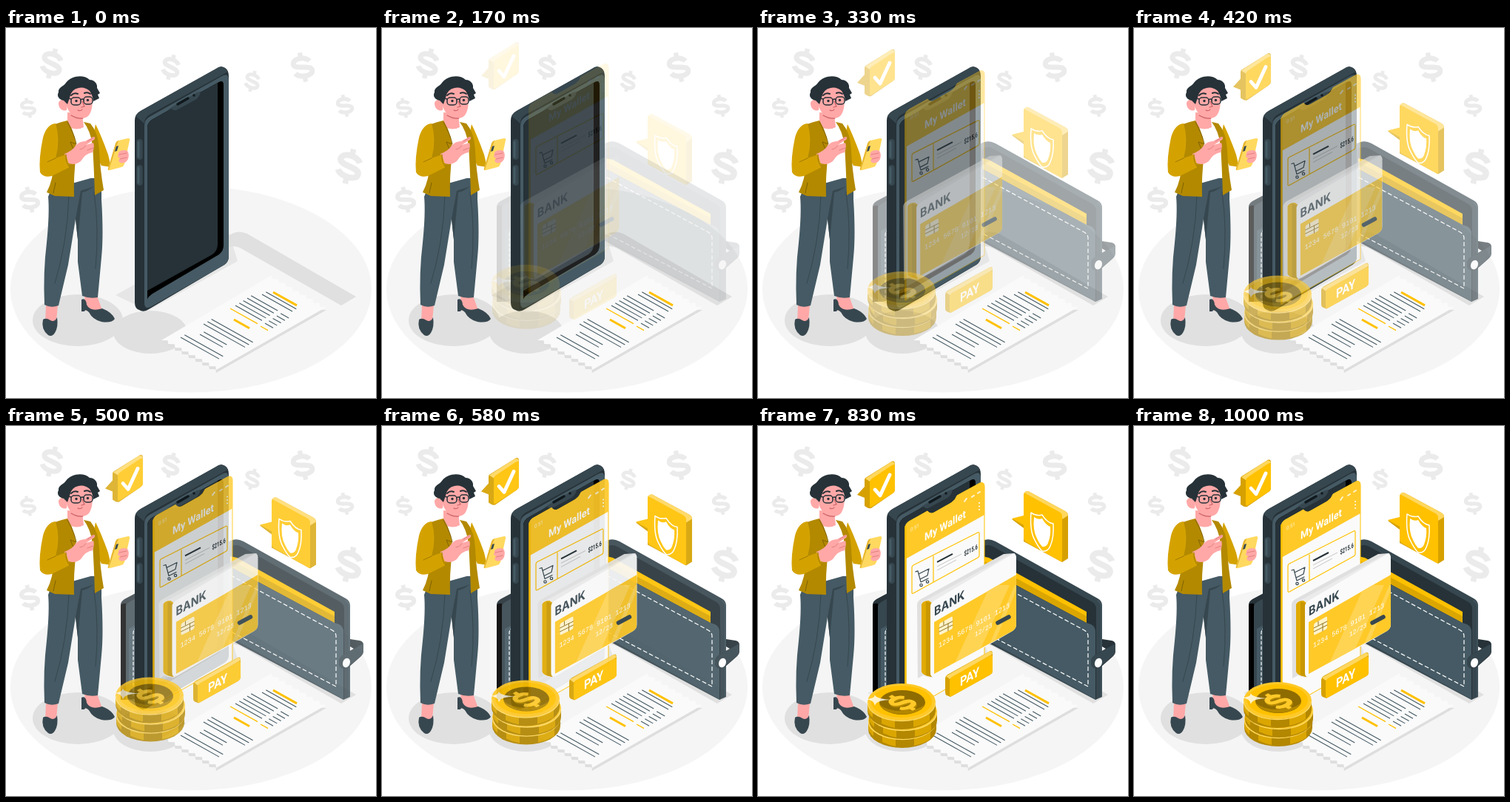
An HTML page for the animation above (1.04 s loop, 500 by 500 pixels).

```html
<!DOCTYPE html>
<html lang="en">
<head>
<meta charset="utf-8">
<title>Mobile wallet</title>
<style>
html, body { margin: 0; width: 100%; height: 100%; overflow: hidden; background: #fff; }
svg { display: block; width: 100vw; height: 100vh; }
text { font-family: Roboto, "Liberation Sans", sans-serif; }
.wide { font-family: Inter, "Liberation Sans", sans-serif; }
.mono { font-family: "Liberation Mono", monospace; }
.line { fill: none; stroke-linecap: round; stroke-linejoin: round; }
</style>
</head>
<body>
<svg viewBox="0 0 500 500">
  <defs>
    <g id="dollar" class="line">
      <path d="M10-6C6-13-10-14-11-6C-11 2 11-2 11 6C11 14-7 13-11 6" stroke-width="6.5" stroke-linecap="butt"/>
      <path d="M0-19V-12M0 12V19" stroke-width="6" stroke-linecap="butt"/>
    </g>
    <g id="coin">
      <path d="M148 371v12a46 25 0 0 0 92 0v-12z" fill="#b38700"/>
      <path d="M148 373v9q2 6 7 10v-9zM167 390v10q8 4 18 6v-10zM210 395v10q14-3 22-9v-10z" fill="#dba600"/>
      <ellipse cx="194" cy="371" rx="46" ry="25" fill="#ffc928"/>
      <path d="M148.500 372a45.500 24.500 0 0 0 91 0" class="line" stroke="#ffd95f" stroke-width="1.500"/>
    </g>
    <clipPath id="cardBand"><path d="M236 265L347 201V268Q347 274 342 277L236 335z"/></clipPath>
  </defs>

  <ellipse cx="250" cy="353" rx="244" ry="139.500" fill="#f5f5f5"/>
  <g id="sky" stroke="#ebebeb"></g>

  <g id="shadows" fill="#e0e0e0">
    <ellipse cx="97" cy="395" rx="61" ry="35"/>
    <ellipse cx="195" cy="411" rx="50" ry="29"/>
    <path d="M148 361L301 276L313 315L192 382z" fill="#e6e6e6"/>
    <path d="M298 283Q311 271 326 278L473 363L453 375L318 298Q308 292 298 298z"/>
  </g>

  <g id="wallet">
    <path d="M155 242Q155 237 160 234L190 218V366L163 370H155z" fill="#263238"/>
    <path d="M155 243Q156 239 162 240V370H155z" fill="#000"/>
    <path d="M162 245Q162 240 168 237L190 225V366L162 370z" fill="#37474f"/>
    <path d="M166 274L190 261V366L166 370z" fill="#455a64"/>
    <path d="M172 365V280Q172 275 176 273L190 266" class="line" stroke="#fff" stroke-width="1.200" stroke-dasharray="4 3"/>
    <path d="M296 160Q308 149 321 156L459 233Q465 236 465 243V366L456 370L296 285z" fill="#37474f"/>
    <path d="M300 165Q309 158 318 163L452 238Q457 241 457 248V369L300 284z" fill="#263238"/>
    <path d="M303 176L312 178L444 251V266L303 190z" fill="#ffc100"/>
    <path d="M303 190L444 266V257L303 181z" fill="#dba600"/>
    <path d="M300 189L444 266L450 268Q456 271 456 278V369L300 284z" fill="#455a64"/>
    <path d="M459 236Q464 239 464 245V365" class="line" stroke="#455a64" stroke-width="1.200"/>
    <path d="M304 202L441 276Q446 279 446 284V352L304 278" class="line" stroke="#fff" stroke-width="1.200" stroke-dasharray="5 4"/>
    <path d="M450 319Q450 313 456 309L470 301L465 298V288L478 290Q483 291 483 296V304Q483 308 480 311L463 326Q450 331 450 319z" fill="#263238"/>
    <path d="M450 319Q450 313 456 309L483 294V304Q483 308 479 311L463 325Q450 331 450 319z" fill="#37474f"/>
    <ellipse cx="460" cy="320" rx="4.800" ry="6.500" fill="#fff" transform="rotate(20 460 320)"/>
  </g>

  <g id="receipt"></g>

  <g id="phone">
    <path d="M174 125Q174 116 182 112L284 55Q290 50 296 54Q301 57 301 65V309Q301 316 295 320L193 380Q186 385 180 381Q174 379 174 371z" fill="#263238"/>
    <path d="M175 119Q177 115 182 112L284 55Q290 50 296 54L300 59L194 117Q187 121 187 129z" fill="#37474f"/>
    <path d="M187 132Q187 124 194 120L290 66Q301 59 301 70V309Q301 316 295 320L197 376Q187 382 187 371z" fill="#455a64"/>
    <path d="M191 135Q191 128 197 124L286 74Q294 69 294 77V294Q294 301 288 306L198 359Q191 364 191 367z" fill="#000"/>
    <path d="M191 135Q191 128 197 124L286 74V292Q286 301 279 306L191 355z" fill="#263238"/>
    <path d="M218 111L227 105L258 87L263 86Q262 93 256 97L232 110Q227 113 224 109z" fill="#37474f"/>
    <path d="M232 103L246 95M254 91v.1" class="line" stroke="#10191d" stroke-width="3.500"/>
    <path d="M180.500 154V174M180.500 189V209" class="line" stroke="#37474f" stroke-width="8"/>
    <path d="M179 154V174M179 189V209" class="line" stroke="#455a64" stroke-width="3"/>
  </g>

  <g id="app">
    <path d="M199 136Q199 130 204 127L229 113Q233 118 238 115L261 102Q267 98 269 92L300 75Q306 73 306 80V324L199 385z" fill="#fafafa" stroke="#ffc100" stroke-width="1"/>
    <path d="M199 136Q199 130 204 127L229 113Q233 118 238 115L261 102Q267 98 269 92L300 75Q306 73 306 80V118L199 178z" fill="#ffc928"/>
    <path d="M199.500 134V384" class="line" stroke="#ffc100" stroke-width="2.500"/>
    <text transform="matrix(.87 -.5 0 1 206 141)" font-size="7" fill="#fff3cc">0:51</text>
    <path d="M279 100l3-4M289 94l3-2M297 89l3-2" class="line" stroke="#fff3cc" stroke-width="2"/>
    <path d="M299 102v.1M299 106.500v.1M299 111v.1" class="line" stroke="#fff" stroke-width="2"/>
    <text transform="matrix(.87 -.5 0 1 225 153.500)" font-size="14.500" font-weight="700" fill="#fff">My Wallet</text>
    <path d="M208 189Q208 187 210 186L297 142Q299 141 299 143V173Q299 175 297 176L210 224Q208 225 208 223zM237 174V209" class="line" stroke="#ffc100" stroke-width="1.200"/>
    <path d="M213 195l3-1 4 15 10-5M217 198l14-7-2 9-10 5" class="line" stroke="#37474f" stroke-width="1.200"/>
    <g fill="none" stroke="#37474f" stroke-width="1.200"><circle cx="220.500" cy="213" r="1.700"/><circle cx="229" cy="208.500" r="1.700"/></g>
    <path d="M242 182L263 171" stroke="#263238" stroke-width="2"/>
    <path d="M242 188L275 171M242 193L268 179" stroke="#c7c7c7" stroke-width="1"/>
    <text transform="matrix(.72 -.4 0 1.150 278.500 174)" font-size="8" font-weight="700" fill="#263238">$215.6</text>
  </g>

  <g id="card">
    <path d="M213 242Q213 237 218 234L330 173L345 172V270L214 341z" fill="#e0e0e0"/>
    <path d="M219 242Q219 236 224 236L340 173Q347 170 347 178L234 340Q219 339 219 332z" fill="#ebebeb"/>
    <path d="M219 241Q221 236 229 236L233 239V339Q219 337 219 331z" fill="#e0aa00"/>
    <path d="M225 237L233 240V339L225 337z" fill="#c99700"/>
    <path d="M231 244Q231 239 236 236L339 175Q347 170 347 180V268Q347 274 342 277L239 337Q231 342 231 333z" fill="#fafafa"/>
    <g clip-path="url(#cardBand)">
      <path d="M236 200H347V340H236z" fill="#ffc928"/>
      <path d="M262 325L312 215H338L288 325zM298 325L345 215H350L304 325z" fill="#ffd453"/>
    </g>
    <text class="wide" transform="matrix(.87 -.5 0 1 236 257)" font-size="16.500" font-weight="700" fill="#37474f">BANK</text>
    <path d="M243 270Q243 267 245 266L259 258Q261 257 261 259V272Q261 274 259 275L245 282Q243 283 243 281z" fill="#fff3cc"/>
    <path d="M243 273l18-9M243 278l18-9M249 264v5M255 267v10" class="line" stroke="#8f7320" stroke-width="1"/>
    <g fill="#fff">
      <text class="mono" transform="matrix(.87 -.5 0 1 242 300)" font-size="9.700">1234 5678 9101 1213</text>
      <text class="mono" transform="matrix(.87 -.5 0 1 291 285)" font-size="9">12/23</text>
    </g>
    <path d="M322 266L337 258" class="line" stroke="#37474f" stroke-width="5.500"/>
  </g>

  <g id="pay">
    <path d="M253 343Q253 340 256 338L312 307Q317 304 317 310V333Q317 336 314 338L260 368L255 366Q253 365 253 362z" fill="#d6a100"/>
    <path d="M254 340L312 307Q316 305 317 310L259 344z" fill="#ffd75e"/>
    <path d="M259 346Q259 343 262 341L314 312Q317 311 317 313V333Q317 336 314 338L262 367Q259 368 259 366z" fill="#ffc100"/>
    <text transform="matrix(.87 -.5 0 1 273 354)" font-size="17" font-weight="700" fill="#fff">PAY</text>
  </g>

  <g id="coins">
    <use href="#coin" x="1" y="25"/><use href="#coin" x="2" y="13"/><use href="#coin"/>
    <ellipse cx="194" cy="370.500" rx="41" ry="21.500" fill="#ffc100"/>
    <ellipse cx="195" cy="371.500" rx="31" ry="16.500" fill="#8f6c00"/>
    <path d="M164.500 374a31 16.500 0 0 0 61 0a33 15 0 0 1-61 0z" fill="#b38700"/>
    <use href="#dollar" transform="translate(196 374) matrix(.75 -.4 .85 .5 0 0)" stroke="#b38700"/>
    <use href="#dollar" transform="translate(195 372) matrix(.75 -.4 .85 .5 0 0)" stroke="#ffc928"/>
    <path d="M145 367Q157 367 158 361Q159 367 182 368Q159 368 158 376Q157 368 145 367z" fill="#fff" opacity=".8"/>
  </g>

  <g id="check">
    <path d="M144 71Q144 68 147 67L179 47Q185 43 185 50V84Q185 87 182 89L153 109Q150 110 147 108L144 106V95L134 91L144 80z" fill="#d6a100"/>
    <path d="M145 69L179 47Q184 45 185 50L151 73z" fill="#ffd75e"/>
    <path d="M151 74Q151 71 154 69L181 51Q185 49 185 52V84Q185 87 182 89L154 107Q151 109 151 106z" fill="#ffc100"/>
    <path d="M158 84L165 92L178 64" class="line" stroke="#fff" stroke-width="4.800" stroke-linecap="butt"/>
  </g>

  <g id="shield">
    <path d="M359 96Q359 90 365 90L415 117Q419 119 419 123V181L411 186L359 158V140L343 128L359 124z" fill="#d6a100"/>
    <path d="M359 95Q360 89 365 90L415 117Q419 119 419 123L411 128z" fill="#ffd75e"/>
    <path d="M359 95Q359 91 363 94L407 118Q411 120 411 124V183Q411 187 407 184L363 159Q359 157 359 153V136L343 127L359 123z" fill="#ffc100"/>
    <path d="M384 122Q376 124 369 119Q367 144 374 156Q379 166 384 171Q392 172 395 164Q400 153 399 134Q391 133 384 122z" class="line" stroke="#fff" stroke-width="1.500"/>
    <path d="M384 127Q378 129 373 125Q371 143 377 154Q380 161 384 165Q390 166 392 160Q396 150 395 138Q389 136 384 127z" fill="#fff"/>
  </g>

  <g id="person">
    <path d="M54 374H70L68 396L53 398z M106 362H123L131 384L108 382z" fill="#ffa8a7"/>
    <path d="M50 394Q54 391 60 395Q66 398 69 391Q71 404 66 412Q62 418 57 415Q47 407 50 394z" fill="#37474f"/>
    <path d="M102 367Q108 364 109 374Q114 384 130 379Q143 384 147 393Q143 399 129 397Q117 394 112 384Q107 379 106 383H102z" fill="#37474f"/>
    <path d="M61 218L125 200Q130 214 129 232Q132 280 129 310L124 364Q113 366 103 362L97 316V286L94 258L84 320L71 375Q61 379 52 374Q50 330 55 290Q59 250 57 228z" fill="#455a64"/>
    <path d="M94 258L101 220L119 214Q108 222 103 222L97 286z" fill="#37474f"/>
    <path d="M85 226Q83 290 66 345M119 222Q126 270 121 325" class="line" stroke="#37474f" stroke-width="1"/>
    <path d="M88 136L104 132L116 150L120 203L91 201z" fill="#fff"/>
    <path d="M83 114L103 116L105 134Q94 140 83 132z" fill="#ffa8a7"/>
    <path d="M121 130Q129 146 138 171L142 188L129 186L115 160z" fill="#d4a200"/>
    <path d="M66 130Q74 127 83 125Q96 146 95 170Q91 200 92 228L66 227L55 222Q64 205 65 180z" fill="#b38900"/>
    <path d="M105 127L114 129Q125 142 126 165Q127 190 132 219L120 226Q119 190 117 158Q114 139 105 127z" fill="#b38900"/>
    <path d="M83 127Q93 145 95 157L87 154L91 164M67 209L64 223" class="line" stroke="#806200" stroke-width="1"/>
    <path d="M79 170Q90 166 94 159Q99 153 107 153L118 147Q122 147 119 151L108 158L118 155Q120 160 117 168Q108 169 101 180Q92 187 83 182z" fill="#ffa8a7"/>
    <path d="M108 159Q104 164 100 164M118 162L110 165M119 148L110 153" class="line" stroke="#e27f80" stroke-width="1"/>
    <path d="M67 129Q55 130 50 148Q44 176 46 195Q51 203 62 200L86 188L81 171L67 176Q74 151 67 129z" fill="#d4a200"/>
    <path d="M67 176L56 181M81 171Q80 181 86 188" class="line" stroke="#9e7900" stroke-width="1"/>
    <path d="M148 156Q149 153 152 152L165 149Q168 149 167 152L160 184Q159 187 156 188L141 192Q137 193 138 190z" fill="#ffd95f"/>
    <path d="M148 156Q149 153 152 152L139 192Q137 192 138 190z" fill="#e6b733"/>
    <path d="M149 160L152 159L150 166L147 167z" fill="#37474f"/>
    <path d="M152 168Q157 163 164 166Q167 170 165 177Q162 184 154 182Q150 178 155 176Q149 175 152 171z" fill="#ffa8a7"/>
    <path d="M153 171l10-2M154 177l9-2" class="line" stroke="#e27f80" stroke-width="1"/>
    <path d="M82 84Q98 73 116 84Q119 108 112 118Q104 126 90 118Q84 113 82 105z" fill="#ffa8a7"/>
    <path d="M82 111Q76 113 72 107Q69 99 75 97Q81 97 83 103z" fill="#ffa8a7"/>
    <path d="M83 103L78 98C72 97 68 92 71 87C70 80 78 79 81 74C88 65 104 62 113 70C120 70 124 76 123 81L127 88L124 90L126 95L118 99Q117 91 113 85Q106 79 98 81Q88 83 86 94z" fill="#263238"/>
    <g class="line" stroke="#263238" stroke-width="1.500">
      <rect x="88" y="94" width="13" height="10" rx="4"/><rect x="105" y="93" width="12" height="10" rx="4"/>
      <path d="M101 97Q103 95 105 97M80 94L88 96"/>
      <path d="M88 91Q92 87 97 89M106 88Q110 86 114 89" stroke-width="2"/>
    </g>
    <circle cx="95" cy="98.500" r="1.700" fill="#263238"/><circle cx="110.500" cy="97.500" r="1.700" fill="#263238"/>
    <path d="M103 99L106 106L102 107M97 111Q101 113 103 110M88 118Q96 123 104 122" class="line" stroke="#c95f66" stroke-width="1.100"/>
  </g>
</svg>
<script>
const LOOP = 1040, FPS = 24, SLIDE = 30;
const byId = id => document.getElementById(id);

// x, y, scale, tilt
const dollars = [
  [62, 48, 1.08, 14], [223, 53, .9, 14], [333, 72, .76, 14], [464, 187, 1.26, 14],
  [401, 53, 1.06, -12], [458, 105, .8, -12], [30, 108, .72, -12], [32, 232, .92, -12]
];
byId('sky').innerHTML = dollars.map(([x, y, scale, tilt]) =>
  `<use href="#dollar" transform="translate(${x} ${y}) rotate(${tilt}) scale(${scale})"/>`).join('');

function zigzag(x, y, dx, dy, teeth, depth) {
  const points = [];
  for (let i = 0; i <= teeth * 2; i++) {
    const k = i / (teeth * 2), bite = i % 2 * depth;
    points.push(`${x + dx * k - bite},${y + dy * k + bite * .58}`);
  }
  return points.join(' ');
}

// Parallel printed lines, each next one a step further up the paper
function printLines(x, y, length, count, color = '#455a64', width = 1.1) {
  let d = '';
  for (let i = 0; i < count; i++) d += `M${x + i * 5.3} ${y - i * 3.3}l${length} ${length * .56}`;
  return `<path d="${d}" stroke="${color}" stroke-width="${width}"/>`;
}

const paper = `${zigzag(359, 334, 74, 43, 8, 4)} ${zigzag(284, 462, -74, -40, 8, -4)}`;
byId('receipt').innerHTML =
  `<polygon points="${paper}" fill="#dedede" transform="translate(0 4)"/>
   <polygon points="${paper}" fill="#fafafa"/>` +
  printLines(236, 418, 52, 2) + printLines(262, 414, 31, 2) + printLines(267, 400, 56, 3) +
  printLines(310, 375, 36, 5) + printLines(350, 399, 11, 5) + printLines(346, 360, 41, 2) +
  printLines(303, 379, 37, 1, '#ffc100', 1.4) + printLines(344, 403, 10, 1, '#ffc100', 1.4) +
  printLines(308, 394, 21, 1, '#ffc100', 3) + printLines(361, 357, 32, 1, '#ffc100', 3);

// Cubic bezier (.36, -.01, .5, 1.38): ends with a small overshoot
function ease(x) {
  const curve = (s, a, b) => 3 * (1 - s) ** 2 * s * a + 3 * (1 - s) * s * s * b + s ** 3;
  let low = 0, high = 1;
  for (let i = 0; i < 24; i++) {
    const mid = (low + high) / 2;
    if (curve(mid, .36, .5) < x) low = mid; else high = mid;
  }
  return curve((low + high) / 2, -.01, 1.38);
}

// Direction each part comes from
const entrances = {
  wallet: [0, 0], app: [0, -1], card: [-1, 0], pay: [0, 1],
  coins: [0, -1], check: [0, -1], shield: [0, 1]
};

function render(time) {
  const t = time % LOOP;
  let step = Math.floor((t + 5) * FPS / 1000);
  if (Math.round(step * 100 / FPS) * 10 > t) step--;
  // Each step shows the pose at its middle
  const progress = ease(Math.min((step + .5) / FPS, 1));
  const opacity = step > 0 ? Math.max(0, Math.min(1, progress)) : 0;
  for (const [id, [dx, dy]] of Object.entries(entrances)) {
    const part = byId(id), rest = SLIDE * (1 - progress);
    part.setAttribute('transform', `translate(${dx * rest} ${dy * rest})`);
    part.setAttribute('opacity', opacity);
  }
}

const start = performance.now();
function tick() {
  render(performance.now() - start);
  requestAnimationFrame(tick);
}
tick();
</script>
</body>
</html>
```
